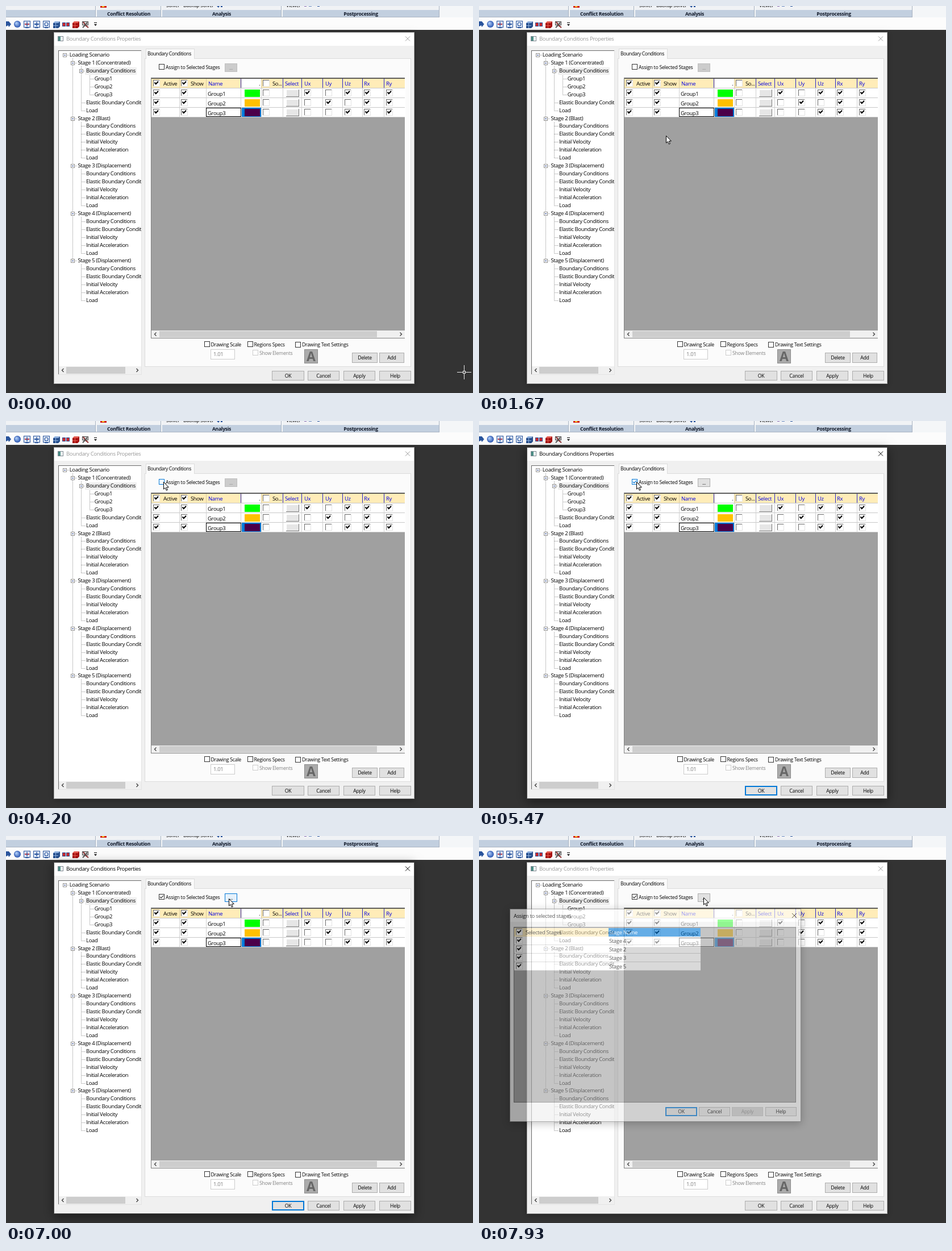
An HTML page with a canvas that plays this animation: 822 by 681 pixels, repeating every 8000 ms.

```html
<!DOCTYPE html>
<html lang="en">
<head>
<meta charset="utf-8">
<title>Boundary Conditions</title>
<style>
html, body { margin: 0; width: 100%; height: 100%; overflow: hidden; background: #333; }
canvas { display: block; }
</style>
</head>
<body>
<canvas id="stage" width="822" height="681"></canvas>
<script>
const stage = document.getElementById('stage').getContext('2d');
let g = stage;
const LOOP = 8000, FPS = 15;
const BLUE = '#0078d7', INK = '#000', FACE = '#f0f0f0', GRAY = '#a0a0a0', LINK = '#0000e0';
const STYLES = {
  ui: ['9.5px', -0.35],
  label: ['8.7px', -0.25],
  tab: ['8.7px', -0.45],
  bold: ['bold 8.6px', -0.28]
};

const clamp = v => Math.max(0, Math.min(1, v));
const mix = (a, b, p) => a + (b - a) * p;

function box(x, y, w, h, fill) {
  g.fillStyle = fill;
  g.fillRect(x, y, w, h);
}

function frame(x, y, w, h, fill, line, width = 1) {
  box(x, y, w, h, line);
  box(x + width, y + width, w - 2 * width, h - 2 * width, fill);
}

function path(points, color, width) {
  g.beginPath();
  points.forEach(([x, y]) => g.lineTo(x, y));
  g.strokeStyle = color;
  g.lineWidth = width;
  g.stroke();
}

function shape(points, fill) {
  g.beginPath();
  points.forEach(([x, y]) => g.lineTo(x, y));
  g.closePath();
  g.fillStyle = fill;
  g.fill();
}

// y is the middle of the capital letters
function text(s, x, y, color = INK, style = 'ui', align = 'left') {
  const [size, gap] = STYLES[style];
  g.font = size + ' "Open Sans", "Noto Sans", sans-serif';
  g.letterSpacing = gap + 'px';
  g.textAlign = align;
  g.fillStyle = color;
  g.fillText(s, x, y + 3.4);
}

function flatCheck(x, y, on, color = '#333') {
  frame(x, y, 10, 10, '#fff', color);
  if (on) path([[x + 2, y + 5], [x + 4, y + 7.2], [x + 8.2, y + 2.6]], color, 1.2);
}

function sunkCheck(x, y, on) {
  box(x, y, 12, 12, '#e3e3e3');
  box(x, y, 11, 11, '#696969');
  box(x + 1, y + 1, 10, 10, '#fff');
  if (on) path([[x + 2.5, y + 4.5], [x + 4.8, y + 7.2], [x + 9, y + 2.8]], INK, 2);
}

function button(label, x, y, w, h, kind = '') {
  const off = kind === 'off';
  const fill = { off: '#ccc', hot: '#e5f1fb', down: '#cce4f7' }[kind] || '#e1e1e1';
  const line = off ? '#bfbfbf' : kind ? BLUE : '#adadad';
  frame(x, y, w, h, fill, line, kind === 'default' ? 2 : 1);
  text(label, x + w / 2, y + h / 2, off ? '#838383' : INK, 'label', 'center');
}

function cross(x, y, r, color) {
  path([[x - r, y - r], [x + r, y + r]], color, 1);
  path([[x - r, y + r], [x + r, y - r]], color, 1);
}

function chevron(x, y, dir) {
  path([[x - 1.5 * dir, y - 3], [x + 1.5 * dir, y], [x - 1.5 * dir, y + 3]], '#444', 1.4);
}

function scrollBar(x, y, w, h, thumbX, thumbW) {
  box(x, y, w, h, FACE);
  box(thumbX, y + 1, thumbW, h - 2, '#cdcdcd');
  chevron(x + 7, y + h / 2, -1);
  chevron(x + w - 7, y + h / 2, 1);
}

function shadow(x, y, w, h, blur, alpha) {
  g.save();
  g.shadowColor = `rgba(0,0,0,${alpha})`;
  g.shadowBlur = blur;
  g.shadowOffsetY = blur / 5;
  box(x, y, w, h, FACE);
  g.restore();
}

function disc(x, y, r) {
  g.beginPath();
  g.arc(x, y, r, 0, 7);
}

function cube(x, y, color, light) {
  box(x - 5, y - 3, 9, 9, color);
  shape([[x - 5, y - 3], [x - 2, y - 6], [x + 7, y - 6], [x + 4, y - 3]], light);
  shape([[x + 4, y - 3], [x + 7, y - 6], [x + 7, y + 3], [x + 4, y + 6]], color);
  box(x - 1, y - 3, 1, 9, light);
  box(x - 5, y + 1, 9, 1, light);
}

function toolbar() {
  const y = 32, navy = '#29549c';
  box(0, 20, 822, 22, '#fcfcfc');
  shape([[0, 27], [5, 27], [9, 32], [5, 37], [4, 34], [0, 36]], navy);
  const ball = g.createRadialGradient(18, 30, 1, 20, y, 6);
  ball.addColorStop(0, '#a9c8f5');
  ball.addColorStop(1, '#2a55b0');
  disc(20, y, 6);
  g.fillStyle = ball;
  g.fill();
  [37, 54, 71].forEach((x, i) => {
    frame(x - 6, y - 6, 12, 12, '#dfe9f8', navy);
    if (i === 2) {
      disc(x, y, 3);
      g.strokeStyle = navy;
      g.lineWidth = 1.2;
      g.stroke();
    } else {
      path([[x - 4, y], [x + 4, y]], i ? navy : '#b63a4a', 2);
      path([[x, y - 4], [x, y + 4]], navy, 1.4);
    }
    box(x - 3, y + 6, 6, 1, navy);
  });
  cube(88, y + 1, '#27508e', '#8fb1df');
  for (const x of [99, 106]) frame(x, 29, 6, 7, '#d42a2a', '#2c4a94');
  cube(122, y + 1, '#a80f0f', '#e45c50');
  frame(134, 27, 11, 7, '#ddd', '#444');
  path([[136, 28], [140, 34], [145, 38]], '#8b2a2a', 2);
  path([[143, 29], [138, 35], [135, 38]], '#555', 2);
  box(155, 29, 5, 1, INK);
  shape([[155, 32], [160, 32], [157.5, 35]], INK);
}

function ribbon() {
  box(0, 0, 822, 20, '#f4f6f8');
  const groups = [[0, 157, ''], [160, 112, 'Conflict Resolution'], [275, 209, 'Analysis'], [487, 275, 'Postprocessing']];
  for (const [x, w, name] of groups) {
    box(x, 0, w, 7, '#f0f2f5');
    box(x, 7, w, 12, '#c2cfdf');
    box(x + w, 0, 1, 19, '#a9b4c2');
    text(name, x + w / 2, 13.2, '#101828', 'bold', 'center');
  }
  box(0, 19, 763, 1, '#aab5c3');
  box(166, 0, 11, 3, '#d32020');
  box(169, 0, 4, 2, '#f6c21c');
  text('Solver', 282, -1, INK, 'label');
  text('Backup Solver', 312, -1, INK, 'label');
  shape([[371, 0], [376, 0], [374, 3]], '#29549c');
  box(378, 0, 3, 2, '#29549c');
  text('Viewer', 493, -1, INK, 'label');
  box(525, 0, 4, 1, '#8a6ab0');
  box(533, 0, 5, 1, '#6a8ac0');
  box(548, 0, 4, 1, '#29549c');
}

// [level, label, expandable]
const tree = [[0, 'Loading Scenario', true]];
['Concentrated', 'Blast', 'Displacement', 'Displacement', 'Displacement'].forEach((type, i) => {
  tree.push([1, `Stage ${i + 1} (${type})`, true], [2, 'Boundary Conditions', i === 0]);
  if (!i) for (let n = 1; n < 4; n++) tree.push([3, 'Group' + n]);
  tree.push([2, 'Elastic Boundary Conditions']);
  if (i) tree.push([2, 'Initial Velocity'], [2, 'Initial Acceleration']);
  tree.push([2, 'Load']);
});
const rowY = i => Math.round(86 + 13.94 * i);
const levelX = n => Math.floor(103 + 14.7 * n);

function dotted(x1, y1, x2, y2) {
  g.setLineDash([1, 1]);
  path([[x1, y1], [x2, y2]], '#909090', 1);
  g.setLineDash([]);
}

function treeView() {
  frame(92, 78, 147, 571, '#fff', '#696969');
  box(238, 78, 1, 571, '#e3e3e3');
  box(92, 648, 147, 1, '#e3e3e3');
  g.save();
  g.beginPath();
  g.rect(93, 79, 145, 556);
  g.clip();
  tree.forEach(([level], i) => {
    const x = levelX(level) + 0.5, y = rowY(i) + 0.5;
    let parent = i - 1;
    while (parent > 0 && tree[parent][0] >= level) parent--;
    if (level) dotted(x, rowY(parent) + 6, x, y);
    dotted(x, y, x + 8, y);
  });
  tree.forEach(([level, label, open], i) => {
    const x = levelX(level), y = rowY(i);
    if (open) {
      frame(x - 3, y - 3, 7, 7, '#fff', '#919191');
      box(x - 1, y, 3, 1, '#26408b');
    }
    if (i === 2) box(139, y - 6, 91, 13, '#efefef');
    text(label, 111.7 + 14.7 * level, y);
  });
  g.restore();
  scrollBar(93, 634, 145, 14, 106, 104);
}

const checkCols = [259, 308, 452, 525, 562, 596, 630, 669];
const rows = [
  ['Group1', '#00ff00', '11010111'],
  ['Group2', '#ffc000', '11001011'],
  ['Group3', '#4b0049', '11000111']
];
const edges = [305, 352, 413, 449, 487, 520, 557, 592, 627, 665];

function grid() {
  frame(255, 126, 448, 459, GRAY, '#808080');
  box(702, 126, 1, 459, '#fff');
  box(256, 127, 446, 1, '#404040');
  box(256, 128, 446, 16, '#ffecb8');
  box(415, 128, 34, 16, '#fff');
  box(256, 144, 446, 52, '#fff');
  for (const y of [144, 161, 178, 195]) box(256, y, 446, 1, '#c8c8c8');
  for (const x of edges) {
    box(x, 144, 1, 52, '#d0d0d0');
    box(x, 128, 1, 16, x > 400 && x !== 449 ? '#2626c8' : '#d8cba0');
  }
  [[259, true], [308, true], [452, false]].forEach(([x, on]) => sunkCheck(x, 130, on));
  [['Active', 277], ['Show', 325], ['.', 445], ['So...', 469]]
    .forEach(([s, x]) => text(s, x, 137));
  [['Name', 356], ['Select', 491], ['Ux', 525], ['Uy', 562], ['Uz', 596], ['Rx', 630], ['Ry', 669]]
    .forEach(([s, x]) => text(s, x, 137, LINK));

  rows.forEach(([name, color, marks], i) => {
    const y = 145 + 17 * i;
    if (i === 2) {
      frame(352, y, 62, 16, '#fff', INK);
      box(415, y, 34, 16, BLUE);
    }
    text(name, 355, y + 9.3);
    box(420, y + 2, 27, 13, color);
    box(493, y + 2, 23, 13, '#777');
    box(493, y + 2, 22, 12, '#fff');
    box(494, y + 3, 21, 11, '#e6e6e6');
    checkCols.forEach((x, c) => sunkCheck(x, y + 2, marks[c] === '1'));
  });
  scrollBar(256, 571, 446, 13, 270, 383);
}

function options() {
  flatCheck(349, 590);
  text('Drawing Scale', 360.5, 595.5, INK, 'label');
  flatCheck(425, 590);
  text('Regions Specs', 436.5, 595.5, INK, 'label');
  flatCheck(509, 591);
  text('Drawing Text Settings', 521, 596, INK, 'label');
  frame(360, 604, 43, 18, '#fff', '#ccc');
  text('1.01', 365, 613, '#7a7a7a');
  flatCheck(434, 605, false, '#ccc');
  text('Show Elements', 446, 611, '#838383', 'label');
  frame(525, 604, 24, 25, '#ababab', '#8c8c8c');
  g.font = 'bold 23px "Open Sans", sans-serif';
  g.letterSpacing = '0px';
  g.textAlign = 'center';
  g.fillStyle = '#676767';
  g.fillText('A', 537, 625);
  button('Delete', 609, 610, 45, 18);
  button('Add', 657, 610, 44, 18);
}

function mainDialog(k) {
  const active = k >= 75 && k < 118, checked = k >= 77;
  shadow(84, 46, 635, 619, active ? 18 : 10, active ? 0.5 : 0.3);
  frame(84, 46, 635, 619, FACE, active ? '#555' : '#aaa');
  box(85, 47, 633, 23, '#fff');
  frame(91, 53, 10, 9, '#fff', '#7d8790');
  box(92, 54, 4, 7, '#4d8f87');
  text('Boundary Conditions Properties', 106, 58, active ? INK : '#999');
  cross(707, 57.5, 4, active ? INK : '#999');
  treeView();

  frame(244, 92, 469, 543, '#fbfbfb', '#dcdcdc');
  frame(246, 75, 86, 18, '#fbfbfb', '#dcdcdc');
  box(247, 91, 84, 3, '#fbfbfb');
  text('Boundary Conditions', 249, 83.5, INK, 'tab');

  const hover = clamp((k - 58) / 4) * clamp((95 - k) / 4);
  flatCheck(269, 102, checked, `rgb(${mix(51, 0, hover)},${mix(51, 120, hover)},${mix(51, 215, hover)})`);
  if (k >= 75 && !checked) box(270, 103, 8, 8, '#cce4f7');
  text('Assign to Selected Stages', 281, 108, INK, 'label');
  const more = !checked ? 'off' : k >= 118 ? '' : k >= 115 ? 'down' : k >= 102 ? 'hot' : '';
  button('...', 385, 101, 22, 15, more);
  grid();
  options();
  button('OK', 468, 642, 57, 17, active && k < 115 ? 'default' : '');
  button('Cancel', 531, 642, 56, 17);
  button('Apply', 594, 642, 56, 17);
  button('Help', 657, 642, 56, 17);
}

function stagesDialog() {
  shadow(54, 128, 513, 375, 14, 0.4);
  frame(54, 128, 513, 375, FACE, '#777');
  box(55, 129, 511, 22, '#fff');
  text('Assign to selected stages', 61, 140.5);
  cross(555, 140, 4, INK);
  frame(61, 160, 497, 309, GRAY, '#696969');
  box(62, 162, 166, 15, '#ffecb8');
  box(228, 162, 162, 15, BLUE);
  sunkCheck(65, 163, true);
  text('Selected Stages', 82, 170);
  text('Stage Name', 229, 170, '#fff');
  [4, 2, 3, 5].forEach((n, i) => {
    const y = 177 + 15 * i;
    box(62, y, 328, 15, '#fff');
    box(62, y + 14, 328, 1, '#c8c8c8');
    sunkCheck(65, y + 1, true);
    text('Stage ' + n, 229, y + 8);
  });
  button('OK', 328, 477, 56, 16, 'default');
  button('Cancel', 387, 477, 55, 16);
  button('Apply', 445, 477, 55, 16, 'off');
  button('Help', 504, 477, 55, 16);
}

// The popup is painted once, then faded in as a single layer
const layer = document.createElement('canvas');
layer.width = 822;
layer.height = 681;
g = layer.getContext('2d');
stagesDialog();
g = stage;

function popup(k) {
  const opening = clamp(k - 118), scale = mix(0.975, 1, opening);
  g.save();
  g.globalAlpha = mix(0.13, 0.6, opening);
  g.translate(310.5 * (1 - scale), 315.5 * (1 - scale));
  g.scale(scale, scale);
  g.drawImage(layer, 0, 0);
  g.restore();
}

// [step, x, y] of the pointer; straight runs between steps
const track = [
  [0, 806, 644], [1, 796, 634], [2, 715, 566], [3, 575, 452], [4, 425, 335], [5, 322, 262],
  [6, 276, 232], [7, 271, 225], [8, 285, 221], [10, 285, 221], [11, 286, 221], [14, 286, 221],
  [17, 296, 222], [21, 318, 226], [25, 329, 228], [46, 329, 228], [49, 322, 211], [53, 301, 160],
  [57, 282, 117], [59, 279, 109], [63, 277, 107], [90, 277, 107], [93, 292, 110], [97, 340, 113],
  [101, 385, 112], [103, 392, 110], [108, 393, 110], [109, 395, 108], [120, 395, 108]
];

function pointer(k) {
  const i = Math.max(1, track.findIndex(p => p[0] >= k));
  const [k0, x0, y0] = track[i - 1], [k1, x1, y1] = track[i];
  const p = (k - k0) / (k1 - k0);
  const x = Math.round(mix(x0, x1, p)), y = Math.round(mix(y0, y1, p));
  if (x > 719) {
    box(x - 12, y, 25, 1, '#e8e8e8');
    box(x, y - 12, 1, 25, '#e8e8e8');
    frame(x - 2, y - 2, 5, 5, '#333', '#e8e8e8');
    box(x, y, 1, 1, '#e8e8e8');
    return;
  }
  const arrow = [[0, 0], [0, 12.5], [2.8, 10], [4.8, 14.6], [6.8, 13.7], [4.9, 9.3], [8.8, 9.1], [0, 0]]
    .map(([a, b]) => [x + 0.5 + a, y + 0.5 + b]);
  shape(arrow, '#fff');
  path(arrow, INK, 1);
}

function render(now) {
  const k = Math.floor((now % LOOP) * FPS / 1000 + 0.05);
  box(0, 0, 822, 681, '#333');
  ribbon();
  toolbar();
  mainDialog(k);
  if (k >= 118) popup(k);
  pointer(k);
  requestAnimationFrame(tick);
}

let start;
function tick(now) {
  start ??= now;
  render(now - start);
}
requestAnimationFrame(tick);
</script>
</body>
</html>
```
